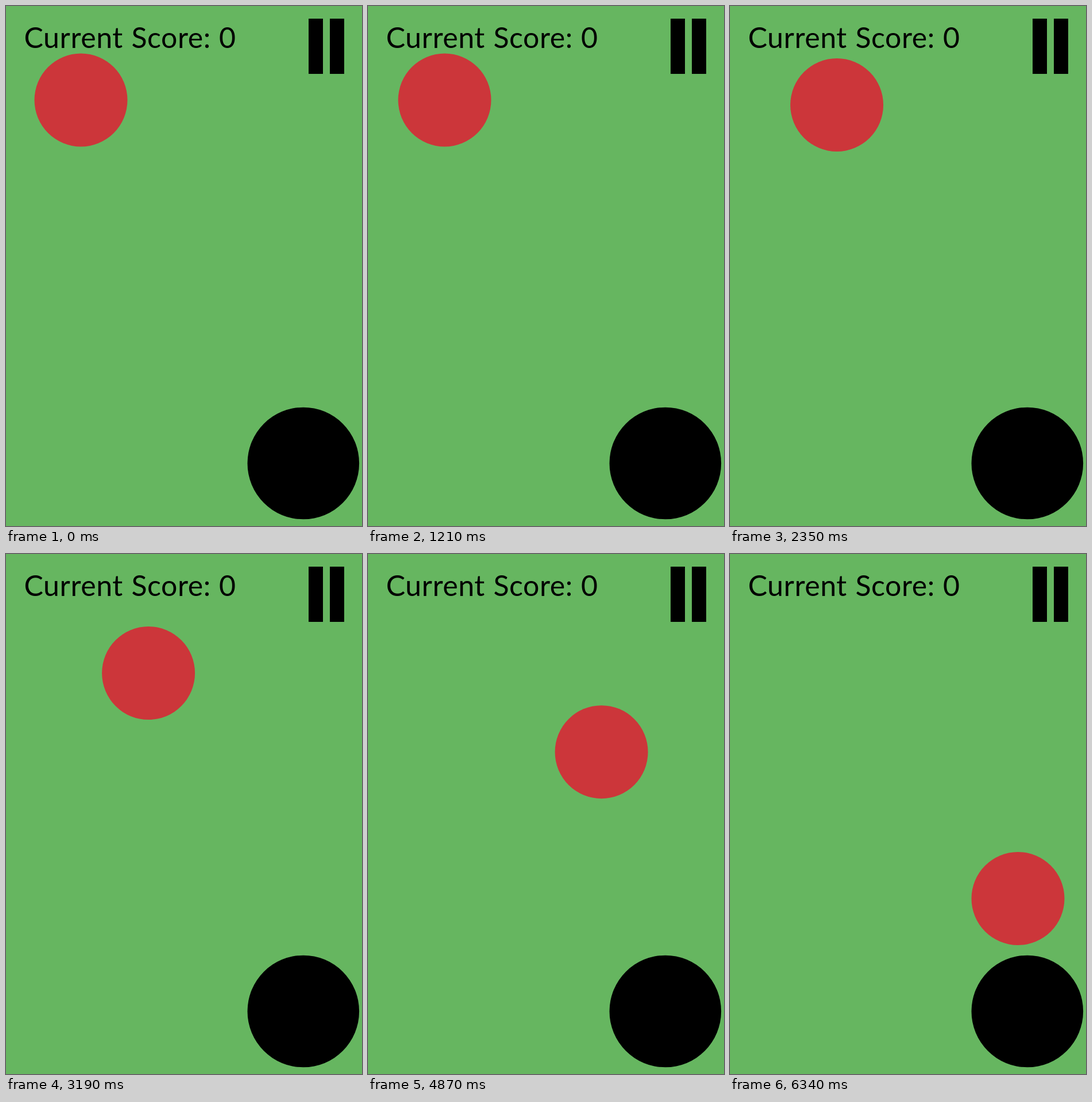
Write an HTML page that moves like this. It is 620 px wide and 904 px high and loops after 6.44 s.

```html
<!DOCTYPE html>
<html lang="en">
<head>
<meta charset="utf-8">
<title>Rolling ball</title>
<style>
  html, body { margin: 0; width: 100%; height: 100%; overflow: hidden; background: #66b660; }
  svg { display: block; }
  text { font: 50px Nunito, Lato, sans-serif; letter-spacing: .6px; }
</style>
</head>
<body>
<svg width="620" height="904" viewBox="0 0 620 904">
  <text y="73"><tspan x="31.5">Current</tspan> <tspan x="218.5">Score:</tspan> <tspan x="371">0</tspan></text>
  <path d="M527 22h25v96h-25zM564 22h25v96h-25z"/>
  <circle cx="517.8" cy="795" r="97.3"/>
  <circle id="ball" r="81" fill="#cc363a"/>
</svg>
<script>
const LOOP = 6440;
const BEAT = 686, MOVING = 590; // each beat ends with a short rest
const ball = document.getElementById("ball");

const path = [
  { t: 950, x: 130.5, y: 163.5 },
  { t: 2350, x: 186, y: 172 },
  { t: 3190, x: 248, y: 207 },
  { t: 4270, x: 337.5, y: 279 },
  { t: 4870, x: 406.5, y: 344 },
  { t: 6340, x: 501.5, y: 599 }
];
const first = path[0], last = path[path.length - 1];

function slope(i, axis) {
  if (i === 0) return 0;
  const a = path[i - 1], b = path[i + 1] ?? last;
  return (b[axis] - a[axis]) / (b.t - a.t);
}

// Cubic Hermite curve through the waypoints
function position(t, axis) {
  const next = Math.max(1, path.findIndex(p => p.t >= t));
  const a = path[next - 1], b = path[next], span = b.t - a.t;
  const u = (t - a.t) / span, v = 1 - u;
  return v * v * (1 + 2 * u) * a[axis] + u * u * (3 - 2 * u) * b[axis]
    + span * u * v * (v * slope(next - 1, axis) - u * slope(next, axis));
}

function draw(time) {
  const rested = time - Math.max(0, time % BEAT - MOVING);
  const t = Math.min(last.t, Math.max(first.t, rested));
  ball.setAttribute("cx", position(t, "x"));
  ball.setAttribute("cy", position(t, "y"));
}

const start = performance.now();
function tick() {
  draw((performance.now() - start) % LOOP);
  requestAnimationFrame(tick);
}
tick();
</script>
</body>
</html>
```
